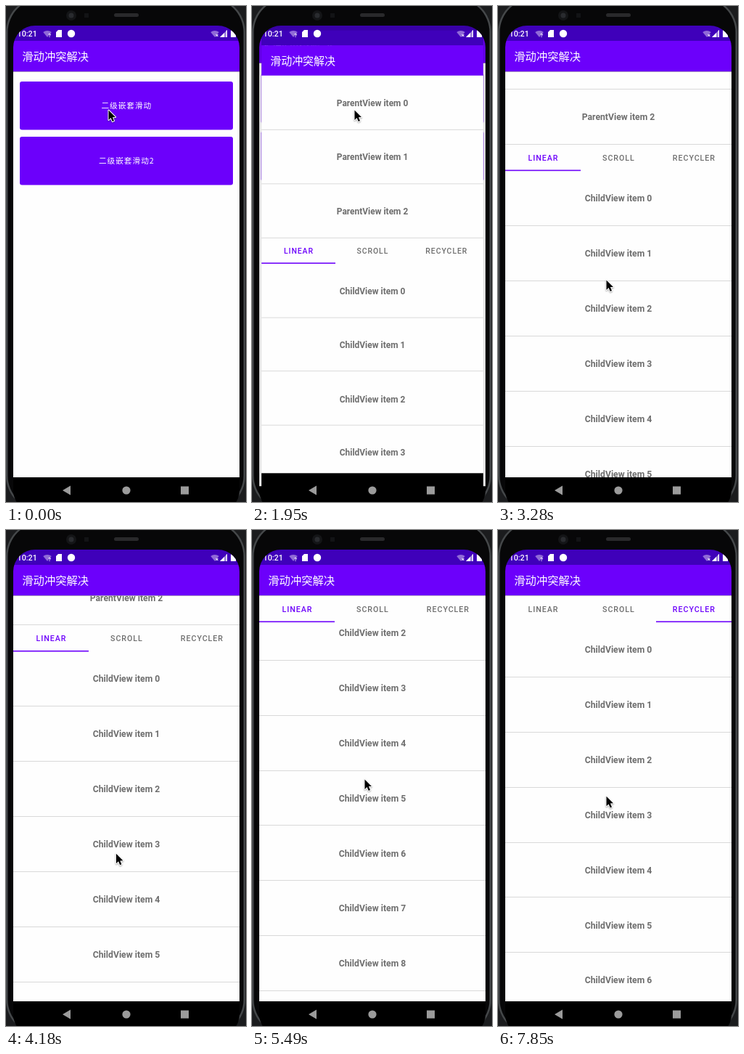
Write an HTML page with a canvas that moves like this. It is 331 by 683 pixels and loops after 8 s.

```html
<!DOCTYPE html>
<html lang="zh">
<head>
<meta charset="utf-8">
<title>滑动冲突解决</title>
<style>
html, body { margin: 0; width: 100%; height: 100%; overflow: hidden; background: #17181a; }
canvas { display: block; }
</style>
</head>
<body>
<canvas id="stage" width="331" height="683"></canvas>
<script>
const ctx = document.getElementById('stage').getContext('2d');
const LOOP = 8000, PAUSE = 1500, STEP_MS = 147.5;
const LEFT = 10, RIGHT = 322, WIDTH = RIGHT - LEFT, MIDDLE = 362;
const TOP = 27, BAR_TOP = 48, CONTENT = 90.4, BOTTOM = 649;
const ROW = 75.9, TAB_HEIGHT = 36, MAX_PARENT_SCROLL = 3 * ROW;
const DRAG_SPEED = 31.9;
const PURPLE = '#6c00fb', DARK_PURPLE = '#3f00ba', GREY = '#6e6e6e';
const ROBOTO = 'Roboto, sans-serif', CJK = '"Noto Sans CJK SC", "Noto Sans CJK", sans-serif';

// Motion, with time counted in screen refreshes

const progress = (t, from, to) => Math.min(1, Math.max(0, (t - from) / (to - from)));
const smooth = u => u * u * (3 - 2 * u);
const opening = t => 1 - (1 - progress(t, 2, 5)) ** 5;
const page = t => smooth(progress(t, 32, 36.4)) + smooth(progress(t, 37, 43));

// Three upward drags at constant speed.
function scrollAt(t) {
  const held = (from, to) => (to - from) * progress(t, from, to);
  return DRAG_SPEED * (held(8, 13) + held(17.13, 22) + held(24.25, 27.3));
}

// The pointer moves with the list while dragging and goes back down between drags.
function pointerAt(t) {
  const x = 141 + 8 * progress(t, 4, 8) + 6 * progress(t, 12, 27)
    + 80 * progress(t, 30, 33) - 150 * progress(t, 33, 37)
    + 140 * progress(t, 37, 39) - 76 * progress(t, 39, 41);
  const y = 142.5 + 361.5 * progress(t, 4, 8) + 128 * progress(t, 13, 17.13)
    + 113 * progress(t, 22, 24.25) + 33 * progress(t, 30, 41) - scrollAt(t);
  return { x, y, visible: t <= 33 || t >= 37 };
}

// Drawing helpers

function rect(x, y, w, h, color) {
  ctx.fillStyle = color;
  ctx.fillRect(x, y, w, h);
}

function rounded(x, y, w, h, r, color) {
  ctx.beginPath();
  ctx.roundRect(x, y, w, h, r);
  ctx.fillStyle = color;
  ctx.fill();
}

function disc(x, y, r, color) {
  rounded(x - r, y - r, 2 * r, 2 * r, r, color);
}

function shape(path, color) {
  ctx.fillStyle = color;
  ctx.fill(new Path2D(path));
}

function text(string, x, middle, size, color, { weight = 400, family = ROBOTO, align = 'center', spacing = 0 } = {}) {
  ctx.font = `${weight} ${size}px ${family}`;
  ctx.letterSpacing = spacing + 'px';
  ctx.textAlign = align;
  ctx.fillStyle = color;
  ctx.fillText(string, x, middle + size * 0.355);
}

function clipped(x, y, w, h, r, draw) {
  ctx.save();
  ctx.beginPath();
  ctx.roundRect(x, y, w, h, r);
  ctx.clip();
  draw();
  ctx.restore();
}

// App screens

function scaledWindow(scale, draw) {
  ctx.save();
  ctx.translate(166, MIDDLE);
  ctx.scale(scale, scale);
  ctx.translate(-166, -MIDDLE);
  rect(LEFT, TOP, WIDTH, BAR_TOP - TOP, DARK_PURPLE);
  rect(LEFT, BAR_TOP, WIDTH, CONTENT - BAR_TOP, PURPLE);
  rect(LEFT, CONTENT, WIDTH, BOTTOM - CONTENT, '#fefefe');
  rect(LEFT, BOTTOM, WIDTH, 2 * MIDDLE - TOP - BOTTOM, '#000');
  text('滑动冲突解决', 22.3, 69.4, 15.3, '#fff', { family: CJK, align: 'left' });
  draw();
  ctx.restore();
}

function drawMenu(pressed) {
  ['二级嵌套滑动', '二级嵌套滑动2'].forEach((label, i) => {
    const y = 104 + 76 * i;
    rounded(19, y, 294, 66.5, 3, pressed && i === 0 ? '#7d22fa' : PURPLE);
    text(label, 166.3, y + 33.7, 10.7, '#fff', { weight: 500, family: CJK, spacing: 0.95 });
  });
}

function drawRows(name, count, x, top) {
  for (let i = 0; i < count; i++) {
    const y = top + i * ROW;
    text(`${name} item ${i}`, x + WIDTH / 2, Math.round(y + 38.62), 12.2, GREY, { weight: 700 });
    rect(x, Math.floor(y + ROW), WIDTH, 1, '#d9d9d9');
  }
}

function drawTabs(top, position) {
  const width = WIDTH / 3;
  ['LINEAR', 'SCROLL', 'RECYCLER'].forEach((label, i) => {
    const color = i === Math.round(position) ? PURPLE : GREY;
    text(label, LEFT + width * (i + 0.5) + 0.4, Math.round(top + 18.4), 10.7, color,
      { weight: 500, spacing: 0.95 });
  });
  rect(LEFT + width * position, top + TAB_HEIGHT - 0.9, width, 1.6, PURPLE);
}

function drawNested(scroll, position) {
  const parentScroll = Math.min(scroll, MAX_PARENT_SCROLL);
  const childScroll = scroll - parentScroll;
  const tabTop = CONTENT + MAX_PARENT_SCROLL - parentScroll;
  const listTop = tabTop + TAB_HEIGHT;

  clipped(LEFT, CONTENT, WIDTH, BOTTOM - CONTENT, 0, () => {
    drawRows('ParentView', 3, LEFT, CONTENT - parentScroll);
    drawTabs(tabTop, position);
    clipped(LEFT, listTop + 0.6, WIDTH, BOTTOM - listTop, 0, () => {
      for (let i = 0; i < 3; i++) {
        const x = Math.round(LEFT + WIDTH * (i - position));
        drawRows('ChildView', 15, x, listTop - (i === 0 ? childScroll : 0));
      }
    });
  });
}

// Phone and system bars

function wifi(x, y, mark) {
  ctx.beginPath();
  ctx.moveTo(x, y + 5);
  ctx.arc(x, y + 5, 9, -Math.PI * 0.72, -Math.PI * 0.28);
  ctx.fillStyle = 'rgba(255,255,255,.42)';
  ctx.fill();
  text(mark, x + 3, y + 2, 7.5, '#fff', { weight: 700 });
}

function drawStatus() {
  text('10:21', 15.6, 38.2, 10.7, '#fff', { weight: 500, align: 'left' });
  wifi(57, 38, '?');
  shape('M72 33h5v10h-8v-7z', '#fff');
  disc(90, 38, 5.2, '#fff');
  wifi(288, 38, '×');
  shape('M295 43l10-10v10z', 'rgba(255,255,255,.5)');
  shape('M295 43l6-6v6zM303.7 34l1.3-1v10h-1.3z', '#fff');
  rect(310, 33.5, 7, 9.5, '#fff');
}

function drawNavigation() {
  const color = '#9b9b9b';
  shape('M78 667l11-6.5v13z', color);
  disc(166, 667, 5.6, color);
  rect(241, 661.5, 11, 11, color);
}

function drawPhone() {
  rect(0, 0, 331, 683, '#1b1c1e');
  rounded(0, -12, 330, 707, 48, '#45484a');
  rounded(2.5, -10, 325, 703, 46, '#070708');
  rounded(149, 10, 34, 5, 2.5, '#29292b');
  disc(90, 13, 7, '#141517');
  disc(90, 13, 3.5, '#292b2f');
  rect(108, 10, 6, 6, '#121315');
}

function drawPointer({ x, y }) {
  const arrow = new Path2D('M.5 1v13.5l3.1-2.9 2.2 5 2.2-1-2.1-4.9 4.1-.2z');
  ctx.save();
  ctx.translate(x, y);
  ctx.lineJoin = 'round';
  ctx.shadowColor = 'rgba(0,0,0,.35)';
  ctx.shadowBlur = 2;
  ctx.shadowOffsetY = 1;
  ctx.strokeStyle = '#fff';
  ctx.lineWidth = 2;
  ctx.stroke(arrow);
  ctx.shadowColor = 'transparent';
  ctx.fillStyle = '#000';
  ctx.fill(arrow);
  ctx.restore();
}

function render(time) {
  const t = Math.floor((time - PAUSE) / STEP_MS);
  const opened = opening(t);
  const pointer = pointerAt(t);
  drawPhone();
  clipped(LEFT, TOP, WIDTH, 2 * (MIDDLE - TOP), 30, () => {
    if (opened < 1) {
      scaledWindow(1 + 0.05 * opened, () => drawMenu(t >= 0));
      rect(LEFT, TOP, WIDTH, 683 - TOP, `rgba(0,0,0,${0.12 * opened})`);
    }
    if (opened > 0) scaledWindow(0.85 + 0.15 * opened, () => drawNested(scrollAt(t), page(t)));
    drawStatus();
    drawNavigation();
  });
  if (pointer.visible) drawPointer(pointer);
}

function frame() {
  render(performance.now() % LOOP);
  requestAnimationFrame(frame);
}
frame();
</script>
</body>
</html>
```
